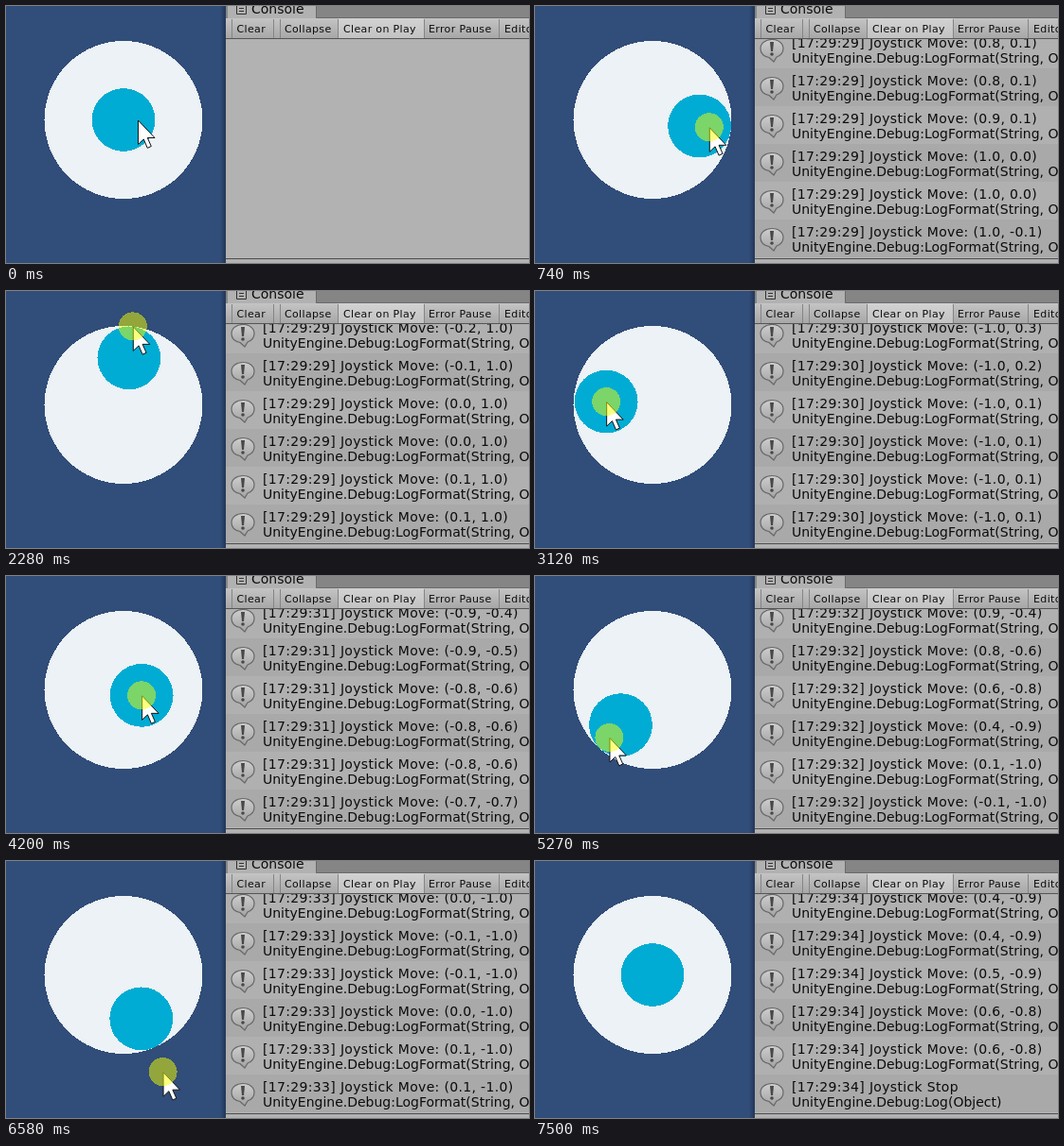
Animation of 552x272 px, one loop 8.51 s. Source, as an HTML page:

```html
<!DOCTYPE html>
<html lang="en">
<head>
<meta charset="utf-8">
<title>Joystick log</title>
<style>
html, body { margin: 0; width: 100%; height: 100%; overflow: hidden; background: #314d79; }
svg { display: block; width: 552px; height: 272px; }
text { font-family: "DejaVu Sans", Verdana, sans-serif; fill: #0c0c0c; white-space: pre; }
.crisp { shape-rendering: crispEdges; }
.bar text { font-size: 11px; letter-spacing: .35px; }
.bar .tab { font-size: 14px; letter-spacing: 0; }
.row text { font-size: 14px; }
.row .msg { letter-spacing: .33px; }
</style>
</head>
<body>
<svg viewBox="0 0 552 272">
  <defs>
    <linearGradient id="tool" x2="0" y2="1">
      <stop offset="0" stop-color="#c4c4c4"/><stop offset="1" stop-color="#a6a6a6"/>
    </linearGradient>
    <linearGradient id="lit" x2="0" y2="1">
      <stop offset="0" stop-color="#d2d2d2"/><stop offset="1" stop-color="#c2c2c2"/>
    </linearGradient>
    <linearGradient id="bubble" x2="0" y2="1">
      <stop offset="0" stop-color="#cecece"/><stop offset="1" stop-color="#a2a2a2"/>
    </linearGradient>
    <linearGradient id="edge">
      <stop offset="0" stop-color="#1c2c48" stop-opacity="0"/><stop offset="1" stop-color="#1c2c48" stop-opacity=".7"/>
    </linearGradient>
    <clipPath id="view"><rect x="232" y="35" width="320" height="232"/></clipPath>
    <g id="icon">
      <path d="M-3 8.5 L2 13 L5 8 C9 6.5 12 3.5 12 -1 C12 -6.5 7 -10.5 0 -10.5 S-12 -6.5 -12 -1 S-8 7.5 -3 8.5Z"
        fill="url(#bubble)" stroke="#686868" stroke-width="1.2"/>
      <path d="M-2 -8 H2 L1 2 H-1Z" fill="#484848"/>
      <circle cy="5" r="1.8" fill="#484848"/>
    </g>
  </defs>
  <rect width="552" height="272" fill="#314d79"/>
  <circle class="crisp" cx="124" cy="120.5" r="83.5" fill="#ecf2f5"/>
  <circle class="crisp" id="knob" r="33.4" fill="#00acd3"/>
  <rect x="226" width="6" height="272" fill="url(#edge)"/>
  <rect x="232" width="320" height="272" fill="#b2b2b2"/>
  <g class="bar">
    <rect x="232" width="320" height="13" fill="#858585"/>
    <path d="M234 0H327V13H234Z" fill="#b1b1b1"/>
    <path d="M327.5 0V12.5H552" fill="none" stroke="#6a6a6a"/>
    <path d="M243.500 -2V8.500H253.500V-2M246 2.500H251M246 5.500H251" fill="none" stroke="#333"/>
    <text class="tab" x="259" y="8">Console</text>
    <rect x="232" y="13" width="320" height="22" fill="url(#tool)"/>
    <rect x="351" y="13" width="90" height="22" fill="url(#lit)"/>
    <path d="M238.5 14V34M282.5 14V34M289.5 14V34M350.5 14V34M441.5 14V34M520.5 14V34" stroke="#858585"/>
    <path d="M232 34.5H552" stroke="#555"/>
    <text x="243.5" y="28">Clear</text>
    <text x="294" y="28">Collapse</text>
    <text x="356" y="28">Clear on Play</text>
    <text x="446" y="28">Error Pause</text>
    <text x="526" y="28">Editor</text>
  </g>
  <g id="log" clip-path="url(#view)"></g>
  <path d="M232 267.5H552" stroke="#4c4c4c"/>
  <path id="cursor" d="M.5 .5V26L6.300 20.500L10.300 29.800L14.300 28L10.300 19H18Z" fill="#fff" stroke="#111"/>
  <circle class="crisp" id="press" r="15" fill="#f6ff00" fill-opacity=".5"/>
</svg>
<script>
const LOOP = 8510, LEAD = 200, STEP = 76.84, PER_STEP = 3;
const PRESS = 3, RELEASE = 86, GONE = 95;
const HUB = { x: 124, y: 120.5 }, REACH = 50;

// The hand's gesture around the hub: step, angle in degrees, distance
const GESTURE = [
  [-1, 0, 15], [1, 33, 8], [3, 33, 8], [7, -6, 60], [15.2, -114.8, 82], [26, -270, 83],
  [30, -289, 85], [37, -188.4, 60], [38.5, -184, 48.5], [47.4, -184, 98], [52, -136, 52],
  [52.8, -17, 20], [64, -11, 76], [66, -97, 78], [67, -132, 68], [73, -150, 66],
  [77.2, -308, 48], [81.5, -458.5, 112], [86, -409, 110], [87.3, -384.7, 124], [95.5, -383, 330]
];
const FIRST = PRESS * PER_STEP + 1, LAST = RELEASE * PER_STEP;

const $ = id => document.getElementById(id);

function make(parent, tag, attrs) {
  const el = document.createElementNS("http://www.w3.org/2000/svg", tag);
  for (const k in attrs) el.setAttribute(k, attrs[k]);
  return parent.appendChild(el);
}

// Offset from the hub, y up
function hand(at) {
  const i = Math.max(1, GESTURE.findIndex(k => k[0] >= at));
  const [t0, a0, r0] = GESTURE[i - 1], [t1, a1, r1] = GESTURE[i];
  const u = Math.max(0, (at - t0) / (t1 - t0));
  const a = (a0 + (a1 - a0) * u) * Math.PI / 180, r = r0 + (r1 - r0) * u;
  return { x: r * Math.cos(a), y: r * Math.sin(a) };
}

function clamp({ x, y }) {
  const k = Math.min(1, REACH / Math.hypot(x, y));
  return { x: x * k, y: y * k };
}

const onStage = p => ({ x: HUB.x + p.x, y: HUB.y - p.y });
const fixed = v => (Math.round(v / REACH * 10) / 10 + 0).toFixed(1);

function entry(e) {
  const step = e / PER_STEP, sec = (LEAD + step * STEP) / 1000;
  const stamp = `[17:29:${29 + Math.max(0, Math.floor(sec - 1.6))}] Joystick `;
  if (e === LAST) return [stamp + "Stop", "UnityEngine.Debug:Log(Object)"];
  const p = clamp(hand(step));
  return [`${stamp}Move: (${fixed(p.x)}, ${fixed(p.y)})`, "UnityEngine.Debug:LogFormat(String, Object[])"];
}

const rows = Array.from({ length: 6 }, (_, i) => {
  const g = make($("log"), "g", { class: "row" });
  make(g, "rect", { x: 232, width: 320, height: 40, fill: i % 2 ? "#a9a9a9" : "#b0b0b0" });
  make(g, "use", { href: "#icon", x: 250, y: 20 });
  return {
    g,
    msg: make(g, "text", { class: "msg", x: 271, y: 18 }),
    call: make(g, "text", { x: 271, y: 34 })
  };
});

function place(el, p) {
  el.setAttribute("transform", `translate(${p.x} ${p.y})`);
}

function show(el, on) {
  el.style.display = on ? "" : "none";
}

function draw(n) {
  // The console falls further behind the hand as its log grows
  const p = hand(n + Math.max(0, n) / 65);
  const held = n >= PRESS && n < RELEASE;
  place($("knob"), held ? onStage(clamp(p)) : HUB);
  place($("cursor"), onStage(p));
  place($("press"), onStage(p));
  show($("cursor"), n < GONE);
  show($("press"), held);

  const last = Math.min(n * PER_STEP, LAST);
  const count = Math.max(0, Math.min(rows.length, last - FIRST + 1));
  const top = count < rows.length ? 36 : 26;
  rows.forEach((row, i) => {
    show(row.g, i < count);
    if (i >= count) return;
    place(row.g, { x: 0, y: top + 40 * i });
    [row.msg.textContent, row.call.textContent] = entry(last - count + 1 + i);
  });
}

const start = performance.now();
let shown = null;
function tick() {
  const t = Math.max(0, performance.now() - start) % LOOP;
  const n = Math.max(-1, Math.min(GONE - 1, Math.floor((t - LEAD + 4) / STEP)));
  const step = t >= LEAD + GONE * STEP - 4 ? GONE : n;
  if (step !== shown) draw(shown = step);
  requestAnimationFrame(tick);
}
tick();
</script>
</body>
</html>
```
